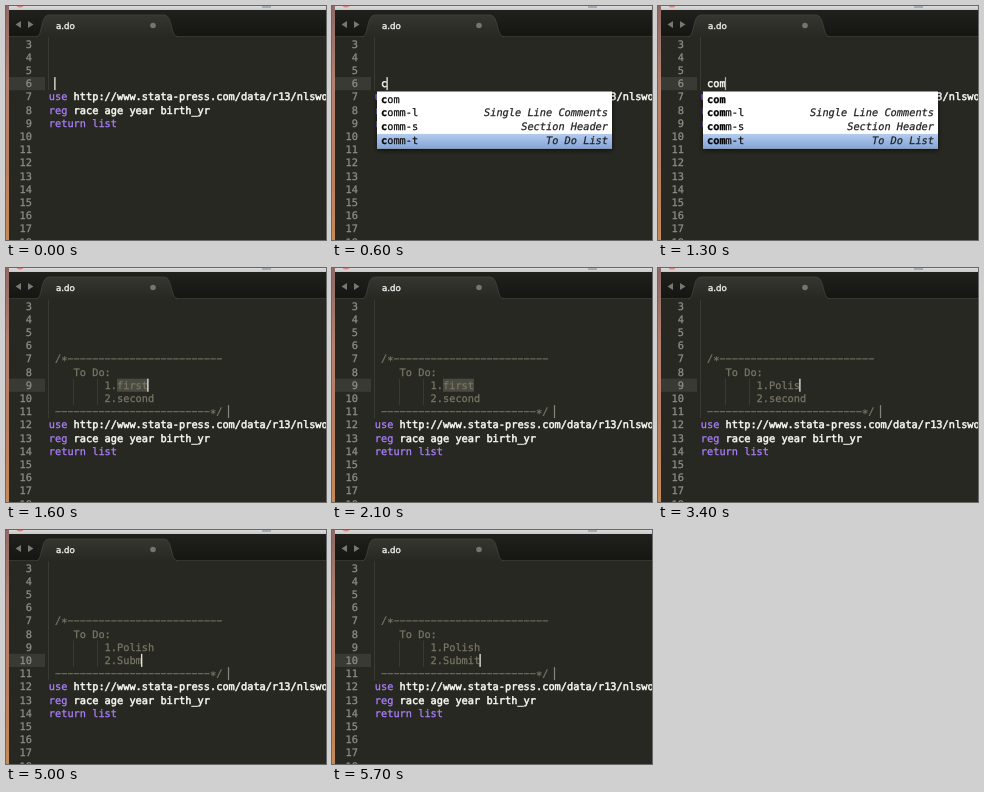
Write an HTML page with a canvas that moves like this. It is 320 px wide and 234 px high and loops after 5800 ms.

```html
<!DOCTYPE html>
<html lang="en">
<head>
<meta charset="utf-8">
<title>Snippet completion in a code editor</title>
<style>
  html, body { margin: 0; width: 100%; height: 100%; overflow: hidden; background: #272822; }
  canvas { display: block; width: 320px; height: 234px; }
</style>
</head>
<body>
<canvas id="stage"></canvas>
<script>
const W = 320, H = 234, LOOP = 5800;
const LEFT = 42.8, COL = 6.2, ROW = 13.2, FIRST_LINE = 3, FIRST_MID = 38;
const MONO = '"DejaVu Sans Mono", monospace';
const C = {
  bg: '#272822', text: '#f8f8f2', keyword: '#ae81ff', comment: '#7a7666',
  gutter: '#8f908a', active: '#393a33', guide: '#393a33', selection: '#4b4a41', caret: '#f8f8f0'
};

const canvas = document.getElementById('stage');
const dpr = window.devicePixelRatio || 1;
canvas.width = W * dpr;
canvas.height = H * dpr;
const ctx = canvas.getContext('2d');
ctx.scale(dpr, dpr);
ctx.textRendering = 'geometricPrecision';

const colX = col => LEFT + col * COL;
const lineMid = line => FIRST_MID + (line - FIRST_LINE) * ROW;

function rect(x, y, w, h, fill) {
  ctx.fillStyle = fill;
  ctx.fillRect(x, y, w, h);
}

function shape(path, fill) {
  ctx.fillStyle = fill;
  ctx.fill(new Path2D(path));
}

function dot(x, y, r, fill) {
  ctx.fillStyle = fill;
  ctx.beginPath();
  ctx.arc(x, y, r, 0, Math.PI * 2);
  ctx.fill();
}

function gradient(y0, y1, ...colors) {
  const g = ctx.createLinearGradient(0, y0, 0, y1);
  colors.forEach((c, i) => g.addColorStop(i / (colors.length - 1), c));
  return g;
}

// A thin outline gives the text its slightly heavier screen weight.
function label(str, x, mid, color, { style = '', align = 'left', font = '10.3px ' + MONO, weight = 0.25 } = {}) {
  ctx.font = style + ' ' + font;
  ctx.textAlign = align;
  ctx.fillStyle = ctx.strokeStyle = color;
  ctx.lineWidth = weight;
  ctx.fillText(str, x, mid + 3.6);
  if (weight) ctx.strokeText(str, x, mid + 3.6);
}

function code(str, line, col, color) {
  label(str, colX(col), lineMid(line), color, { weight: color === C.text ? 0.5 : 0.25 });
}

function caret(line, col, color = C.caret) {
  rect(colX(col) - 0.7, lineMid(line) - 6.5, 1.2, 13, color);
}

function guide(col, from, to) {
  rect(Math.round(colX(col)) - 1, lineMid(from) - ROW / 2, 1, (to - from + 1) * ROW, C.guide);
}

// Hyphens that almost touch, one per column.
function dashes(line, col, count) {
  for (let i = 0; i < count; i++)
    rect(colX(col + i) + 0.4, lineMid(line) - 0.4, COL - 0.8, 1, C.comment);
}

// Number of characters whose key time has passed.
const typed = (word, times, t) => word.slice(0, times.filter(k => t >= k).length);

function drawGutter(activeLine) {
  rect(3, lineMid(activeLine) - ROW / 2, 36, ROW, C.active);
  for (let n = FIRST_LINE; n <= 18; n++)
    label(n, 26, lineMid(n), C.gutter, { align: 'right' });
}

function drawCommands(line) {
  code('use', line, 0, C.keyword);
  code('http://www.stata-press.com/data/r13/nlswork', line, 4, C.text);
  code('reg', line + 1, 0, C.keyword);
  code('race age year birth_yr', line + 1, 4, C.text);
  code('return list', line + 2, 0, C.keyword);
}

function drawPopup(prefix) {
  const x = 45, y = 85.5, w = 235, h = 57, row = 13.8;
  ctx.save();
  ctx.shadowColor = 'rgba(0,0,0,.6)';
  ctx.shadowBlur = 5 * dpr;
  ctx.shadowOffsetY = 2 * dpr;
  rect(x, y, w, h, '#fff');
  ctx.restore();
  rect(x, y + 3 * row + 1, w, h - 3 * row - 1, gradient(128, 142, '#b4cbed', '#84a6da'));
  const items = [['com', ''], ['comm-l', 'Single Line Comments'],
                 ['comm-s', 'Section Header'], ['comm-t', 'To Do List']];
  items.forEach(([name, hint], i) => {
    const mid = 93 + i * row, n = prefix.length;
    label(prefix, 49, mid, '#000', { style: 'bold' });
    label(name.slice(n), 49 + n * COL, mid, '#111');
    label(hint, 276, mid, '#222', { style: 'italic', align: 'right' });
  });
}

function drawTyping(t) {
  const word = typed('com', [600, 700, 900], t);
  guide(0, 3, 6);
  drawGutter(6);
  drawCommands(7);
  code(word, 6, 1, C.text);
  caret(6, 1 + word.length, t >= 1300 ? '#b5b5ae' : C.caret);
  if (word) drawPopup(word);
}

function drawField(line, word, placeholder, selected) {
  if (selected) rect(colX(11), lineMid(line) - 6.5, placeholder.length * COL, 13, C.selection);
  code(word || placeholder, line, 11, C.comment);
}

function drawSnippet(t) {
  const first = typed('Polish', [2400, 2700, 3000, 3200, 3400, 3600], t);
  const second = typed('Submit', [4400, 4600, 4800, 5000, 5300, 5500], t);
  const onSecond = t >= 3800;
  const line = onSecond ? 10 : 9;
  const word = onSecond ? second || 'second' : first || 'first';

  guide(0, 3, 11);
  guide(4, 9, 10);
  guide(8, 9, 10);
  drawGutter(line);
  code('/∗', 7, 1, C.comment);
  dashes(7, 3, 25);
  code('To Do:', 8, 4, C.comment);
  code('1.', 9, 9, C.comment);
  code('2.', 10, 9, C.comment);
  drawField(9, first, 'first', !first);
  drawField(10, second, 'second', onSecond && !second);
  dashes(11, 1, 25);
  code('∗/', 11, 26, C.comment);
  caret(11, 29, '#85857c');
  drawCommands(12);
  if (t < 2000 || t >= 2400) caret(line, 11 + word.length);
}

function drawWindow() {
  rect(0, 0, 3, H, gradient(0, H, '#8f6a66', '#b5806f', '#b97f62', '#c48a58'));
  rect(3, 0, W - 3, 4, gradient(0, 4, '#dcdcdc', '#c8c8c8'));
  rect(256, 0, 9, 2, '#a3adb4');
  dot(14, -3, 4.5, '#d98680');
  rect(3, 4, W - 3, 27, gradient(4, 31, '#20211d', '#151612'));
  rect(3, 30, W - 3, 1, '#34352f');
  const tab = 'M30 31 C37 31 34 9 43 9 H158 C167 9 164 31 172 31';
  shape(tab + ' Z', gradient(9, 31, '#35362f', C.bg));
  ctx.strokeStyle = '#42433c';
  ctx.lineWidth = 0.8;
  ctx.stroke(new Path2D(tab));
  shape('M15 15 V22 L9.5 18.5 Z M22 15 V22 L27.5 18.5 Z', '#777872');
  label('a.do', 50, 19.5, '#ececea', { font: '8.7px "DejaVu Sans", sans-serif', weight: 0.4 });
  dot(147, 19.5, 2.8, '#74756f');
}

function draw(t) {
  rect(0, 0, W, H, C.bg);
  if (t < 1600) drawTyping(t); else drawSnippet(t);
  drawWindow();
}

function tick() {
  draw(performance.now() % LOOP);
  requestAnimationFrame(tick);
}
tick();
</script>
</body>
</html>
```
